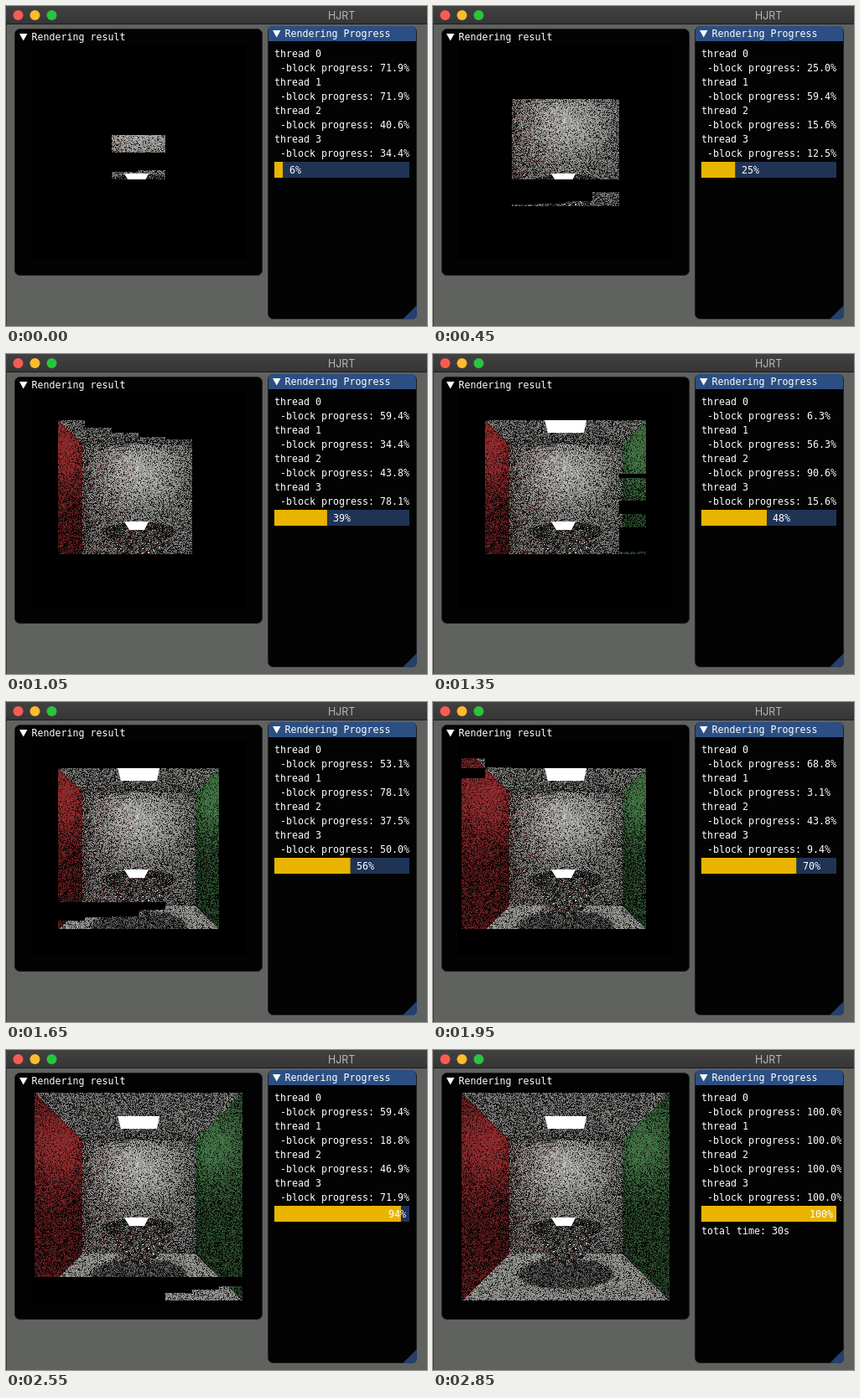
Recreate the animation shown at these times as an HTML page with a canvas. Size 502 px wide and 382 px high, loop 3 s.

```html
<!DOCTYPE html>
<html lang="en">
<head>
<meta charset="utf-8">
<title>HJRT</title>
<style>
html, body { margin: 0; width: 502px; height: 382px; overflow: hidden; background: #606260; }
svg, canvas { position: absolute; display: block; }
svg { left: 0; top: 0; }
canvas { left: 30px; top: 47px; }
text { font: 11.63px "DejaVu Sans Mono", monospace; fill: #fff; white-space: pre; }
.title { font: 12.4px Inter, sans-serif; fill: #b5b5b5; }
</style>
</head>
<body>
<svg width="502" height="382" viewBox="0 0 502 382">
  <defs>
    <linearGradient id="bar" x2="0" y2="1">
      <stop stop-color="#424142"/><stop offset="1" stop-color="#373637"/>
    </linearGradient>
    <clipPath id="panel"><path d="M313 24H487V374H313z"/></clipPath>
  </defs>
  <path fill="url(#bar)" d="M0 0H502V21H0z"/>
  <path fill="#1c1c1c" d="M0 21H502V22H0z"/>
  <path fill="#3c3d3c" d="M0 22H1V382H0z"/>
  <circle cx="14.5" cy="11" r="6" fill="#fc5b53"/>
  <circle cx="34.5" cy="11" r="6" fill="#fdbc2e"/>
  <circle cx="54.5" cy="11" r="6" fill="#29c53f"/>
  <text class="title" x="384" y="15.5">HJRT</text>

  <rect x="10.5" y="27.5" width="295" height="294" rx="6" fill="#030303" stroke="#222"/>
  <path fill="#fff" d="M16 33H25.5L20.7 41.5z"/>
  <text x="30.5" y="41">Rendering result</text>

  <rect x="312.5" y="24.5" width="177" height="349" rx="6" fill="#030303" stroke="#222"/>
  <path fill="#2c4f83" d="M313 42V30Q313 24 319 24H483Q489 24 489 30V42z"/>
  <path fill="#fff" d="M318 29H327.5L322.7 37.5z"/>
  <text x="332.5" y="37">Rendering Progress</text>
  <path fill="#25406b" d="M490 357V368Q490 374 484 374H473z"/>
  <path fill="#1f3354" d="M320 186H481V205H320z"/>
  <rect id="fill" x="320" y="186" height="19" fill="#e8b400"/>
  <text id="percent" y="200"></text>
  <g id="threads" clip-path="url(#panel)"></g>
  <text id="total" x="320" y="220">total time: 30s</text>
</svg>
<canvas id="view" width="256" height="256"></canvas>

<script>
const STEP = 150, LOOP = 3000, SIZE = 32, BLOCKS = 64, LEFT = 30, TOP = 47;
const LAG = 2; // rows by which the picture trails the counters

// Rows rendered so far by each thread, at a few times; linear in between
const keys = [
  { t: 0, rows: [23, 23, 13, 11] },
  { t: 450, rows: [104, 115, 101, 100] },
  { t: 1050, rows: [179, 203, 174, 185] },
  { t: 1650, rows: [273, 281, 268, 272] },
  { t: 1950, rows: [342, 353, 334, 323] },
  { t: 2250, rows: [422, 395, 413, 430] },
  { t: 2850, rows: [512, 512, 512, 512] }
];

const $ = id => document.getElementById(id);
const view = $("view").getContext("2d");

function rowsAt(t) {
  const i = keys.findIndex(key => key.t >= t);
  const b = keys[i], a = keys[i - 1] || b;
  const f = (t - a.t) / (b.t - a.t || 1);
  return a.rows.map((n, j) => Math.round(n + (b.rows[j] - n) * f));
}

// Blocks run outwards from the middle of an 8 x 8 grid
function spiral() {
  const path = [[3, 3]], dirs = [[1, 0], [0, 1], [-1, 0], [0, -1]];
  let x = 3, y = 3;
  for (let leg = 0; path.length < BLOCKS; leg++) {
    const [dx, dy] = dirs[leg % 4];
    for (let n = (leg >> 1) + 1; n-- && path.length < BLOCKS;) path.push([x += dx, y += dy]);
  }
  return path;
}

function random(seed) {
  return () => {
    seed = seed + 0x6D2B79F5 | 0;
    let t = Math.imul(seed ^ seed >>> 15, 1 | seed);
    t = t + Math.imul(t ^ t >>> 7, 61 | t) ^ t;
    return ((t ^ t >>> 14) >>> 0) / 4294967296;
  };
}

const rnd = random(7);
const gray = v => [v, v, v * .98];
const ellipse = (u, v, rx, ry) => (u / rx) ** 2 + (v / ry) ** 2;

function glassColor() {
  const r = rnd();
  if (r < .1) return [140, 45, 45];
  if (r < .14) return [45, 105, 55];
  return gray(r > .95 ? 230 : 120);
}

// Colour of a lit sample and the chance that it is lit
function shade(x, y) {
  const u = x - 158, v = y - 175, m = Math.max(Math.abs(u), Math.abs(v));
  const glow = (cx, cy, s) => Math.exp(-ellipse(x - cx, y - cy, s, s));
  const edge = Math.min(1, .75 + Math.abs(m - 68) / 60);

  const rim = ellipse(u, y - 212, 44, 12) < 1;
  if (rim && y < 226) return [glassColor(), Math.abs(u) < 22 && y > 209 ? .5 : .27];
  if (y >= 212 && ellipse(u, y - 212, 32, 47) < 1) {
    return [glassColor(), .5 + .25 * Math.sin(u * .45) * Math.cos(v * .4)];
  }
  if (m < 68) {
    const g = glow(157, 138, 52);
    const red = rnd() < .16 * (1 - (x - 90) / 70);
    return [red ? [120, 50, 50] : gray(135 + 60 * g), (.6 + .35 * g) * edge];
  }
  if (Math.abs(u) >= Math.abs(v)) {
    const left = u < 0, g = glow(left ? 66 : 242, 112, 52);
    const c = left ? [165, 50, 53] : [76, 130, 78];
    return [c.map(n => n * (.7 + .3 * g)), (.5 + .42 * g) * edge];
  }
  if (v < 0) return [gray(140), .56 * edge];
  const shadow = Math.min(1, Math.max(0, (1.12 - ellipse(u, y - 267, 57, 18)) * 4));
  return [gray(165 - 60 * shadow), .78 - .26 * shadow];
}

function poly(ctx, ...pts) {
  ctx.beginPath();
  for (const [x, y] of pts) ctx.lineTo(x - LEFT, y - TOP);
  ctx.fill();
}

function renderScene() {
  const canvas = document.createElement("canvas");
  canvas.width = canvas.height = 256;
  const ctx = canvas.getContext("2d"), img = ctx.createImageData(256, 256);
  for (let y = 0; y < 256; y++) for (let x = 0; x < 256; x++) {
    const i = (y * 256 + x) * 4;
    img.data[i + 3] = 255;
    if (Math.min(x, y) < 4 || Math.max(x, y) > 251) continue;
    const [c, p] = shade(x + LEFT, y + TOP);
    const k = rnd() < p ? .6 + .45 * rnd() : .3 * rnd();
    for (let j = 0; j < 3; j++) img.data[i + j] = c[j] * k;
  }
  ctx.putImageData(img, 0, 0);
  ctx.fillStyle = "#fff";
  poly(ctx, [133, 79], [183, 79], [180, 94], [137, 94]);
  poly(ctx, [141, 200], [170, 200], [165, 210], [147, 210]);
  for (let i = 0; i < 9; i++) ctx.fillRect(100 + i * 6.5 | 0, 178 + 20 * rnd() | 0, 2, 1);
  return canvas;
}

function addText(x, y, str) {
  const el = document.createElementNS("http://www.w3.org/2000/svg", "text");
  el.setAttribute("x", x);
  el.setAttribute("y", y);
  el.textContent = str;
  $("threads").append(el);
  return el;
}

const order = spiral(), scene = renderScene();
const labels = [0, 1, 2, 3].map(i => {
  addText(320, 61 + i * 34, "thread " + i);
  return addText(327, 78 + i * 34, "");
});

function drawBlocks(started, rows) {
  const open = [...rows].sort((a, b) => b - a);
  view.fillStyle = "#000";
  view.fillRect(0, 0, 256, 256);
  order.slice(0, started).forEach(([col, row], i) => {
    const done = open[i - started + open.length] ?? SIZE;
    const h = done < SIZE ? Math.max(0, done - LAG) : SIZE;
    const x = col * SIZE, y = (row + 1) * SIZE - h;
    if (h) view.drawImage(scene, x, y, SIZE, h, x, y, SIZE, h);
  });
}

function drawPanel(started, rows) {
  rows.forEach((n, i) => {
    labels[i].textContent = `-block progress: ${(n / SIZE * 100).toFixed(1)}%`;
  });
  const part = started / BLOCKS, width = part * 161, str = Math.round(part * 100) + "%";
  $("fill").setAttribute("width", width);
  $("percent").textContent = str;
  $("percent").setAttribute("x", Math.min(328 + Math.floor(width), 477 - str.length * 7));
  $("total").style.display = rows.every(n => n === SIZE) ? "" : "none";
}

function draw(t) {
  const totals = rowsAt(t);
  const started = totals.reduce((sum, n) => sum + Math.ceil(n / SIZE), 0);
  const rows = totals.map(n => (n - 1) % SIZE + 1);
  drawBlocks(started, rows);
  drawPanel(started, rows);
}

let shown = -1;
function tick() {
  const t = Math.floor(performance.now() % LOOP / STEP) * STEP;
  if (t !== shown) draw(shown = t);
  requestAnimationFrame(tick);
}
tick();
</script>
</body>
</html>
```
